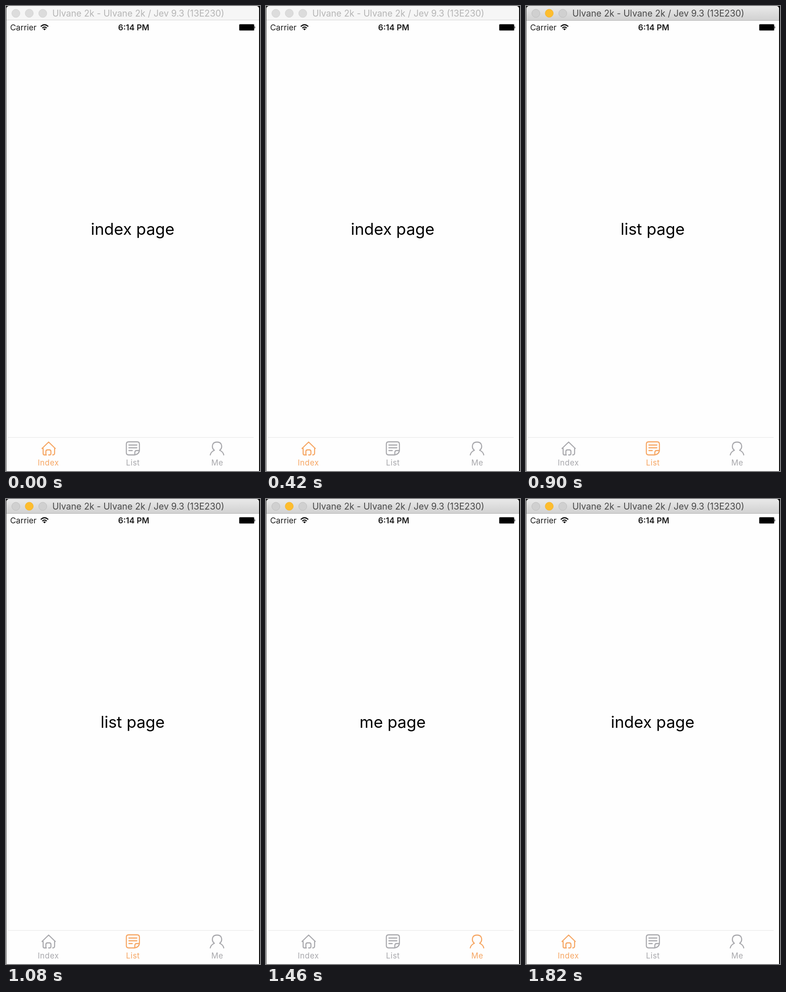
An HTML page that plays this animation: 554 by 1012 pixels, repeating every 1840 ms.

```html
<!DOCTYPE html>
<html lang="en">
<head>
<meta charset="utf-8">
<title>Tab bar demo</title>
<style>
  html, body { margin: 0; width: 100%; height: 100%; overflow: hidden; background: #000; }
  svg { display: block; width: 554px; height: 1012px; font-family: Inter, "Liberation Sans", sans-serif; }
  .title { fill: #b5b5b5; font-size: 19.4px; }
  .bar { fill: #f6f6f6; }
  .rule { fill: #d3d3d3; }
  .dot { fill: #dcdcdc; stroke: #d2d2d2; }
  .focused .title { fill: #484848; }
  .focused .bar { fill: url(#shade); }
  .focused .rule { fill: #b4b4b4; transform: translateY(1px); }
  .focused .dot { fill: #d0d0d0; stroke: #bebebe; }
  .focused .mid { fill: #fdbd2e; stroke: #f3b32c; }
  .status { font-size: 17.6px; fill: #1c1c1c; }
  .page { font-size: 35px; fill: #000; text-anchor: middle; }
  .tab { color: #a8a8ac; }
  .tab.on { color: #f6a663; }
  .tab path { fill: none; stroke: currentColor; stroke-width: 2.3; stroke-linecap: round; stroke-linejoin: round; }
  .tab text { fill: currentColor; font-size: 17px; letter-spacing: .5px; text-anchor: middle; }
</style>
</head>
<body>
<svg id="stage" viewBox="0 0 554 1012">
  <defs>
    <linearGradient id="shade" x2="0" y2="1">
      <stop stop-color="#e9e9e9"/>
      <stop offset="1" stop-color="#d1d1d1"/>
    </linearGradient>
  </defs>
  <rect width="554" height="1012"/>
  <rect width="1" height="1012" fill="#484848"/>
  <path d="M1 1012V7Q1 0 8 0H545Q552 0 552 7V1012Z" fill="#fefefe"/>

  <path class="bar" d="M1 31V7Q1 0 8 0H545Q552 0 552 7V31Z"/>
  <rect class="rule" x="1" y="30" width="551" height="1"/>
  <circle class="dot" cx="21.5" cy="16" r="8.8"/>
  <circle class="dot mid" cx="50.7" cy="15.8" r="8.8"/>
  <circle class="dot" cx="80.2" cy="16" r="8.8"/>
  <text class="title" x="101" y="23">Ulvane 2k - Ulvane 2k / Jev 9.3 (13E230)</text>

  <text class="status" x="9" y="53">Carrier</text>
  <g fill="none" stroke="#111" stroke-width="2.3">
    <path d="M75.8 44.6Q84 36.8 92.2 44.6M79 48Q84 43.4 89 48"/>
    <path d="M81 50Q84 47.6 87 50L84 53Z" fill="#111" stroke="none"/>
  </g>
  <text class="status" x="278.5" y="53" font-weight="600" text-anchor="middle">6:14 PM</text>
  <rect x="508" y="39" width="34" height="15" rx="2.5" fill="#aaa"/>
  <rect x="509" y="40" width="32" height="13" rx="1.5"/>
  <path d="M542 43.5Q545 46.5 542 49.5Z" fill="#222"/>

  <text class="page" id="page" x="276.2" y="498"></text>

  <rect x="4" y="938.5" width="536" height="1" fill="#e6e6e6"/>
  <g class="tab">
    <path d="M88 977H84Q81 977 81 974V963H78.5L93 949L107.5 963H106V973Q106 977 102 977M87 977V969.5Q87 966 90.5 966H94.5Q98 966 98 969.5V974Q98 977 95 977H93"/>
    <text x="92.3" y="1000">Index</text>
  </g>
  <g class="tab">
    <path d="M281 977H267.5Q262.5 977 262.5 972V953.5Q262.5 948.5 267.5 948.5H286Q291 948.5 291 953.5V967.5Q290 975 281 977V972Q281 967.5 285 967.5H291M268 955.5H285.5M268 961.5H285.5M268 967.5H275.5"/>
    <text x="276.8" y="1000">List</text>
  </g>
  <g class="tab">
    <path d="M445.5 977Q447 970 454.5 967C448 962 448 949 460.3 949C472.5 949 472.5 962 466 967Q473.5 970 475 977"/>
    <text x="460.8" y="1000">Me</text>
  </g>
</svg>
<script>
  const LOOP = 1840;
  const LABELS = ["index page", "list page", "me page"];
  // [start in ms, selected tab]
  const TAPS = [[0, 0], [880, 1], [1180, 2], [1480, 1], [1780, 0]];
  const stage = document.getElementById("stage");
  const page = document.getElementById("page");
  const tabs = document.querySelectorAll(".tab");
  const startTime = performance.now();

  function draw(now) {
    const t = Math.max(0, now - startTime) % LOOP;
    const [, selected] = TAPS.findLast(([start]) => t >= start);
    stage.classList.toggle("focused", t >= TAPS[1][0]);
    tabs.forEach((tab, i) => tab.classList.toggle("on", i === selected));
    page.textContent = LABELS[selected];
    requestAnimationFrame(draw);
  }
  draw(startTime);
</script>
</body>
</html>
```
